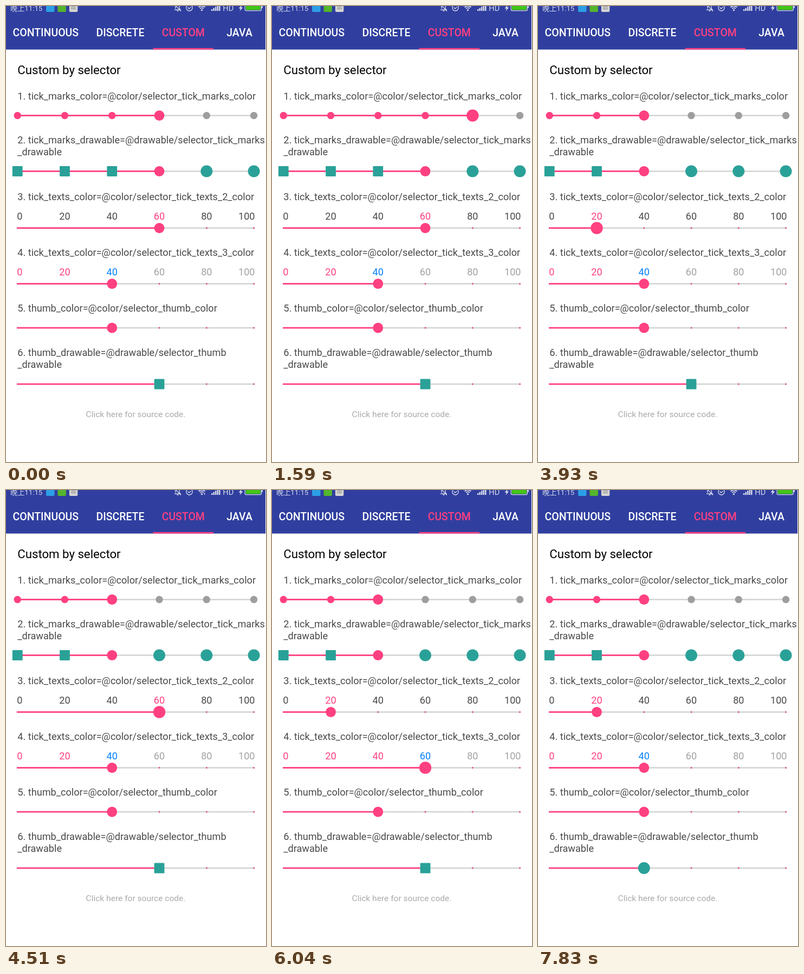
These frames come from a looping animation (480x843 px, 8000 ms). An HTML page with a canvas:

```html
<!DOCTYPE html>
<html lang="en">
<head>
<meta charset="utf-8">
<title>Custom by selector</title>
<style>
  html, body { margin: 0; width: 100%; height: 100%; overflow: hidden; background: #fff; }
  canvas { display: block; width: 480px; height: 843px; }
</style>
</head>
<body>
<canvas id="stage"></canvas>
<script>
const W = 480, H = 843, LOOP = 8000, STEP = 94;
const PINK = '#ff4081', BLUE = '#007fff', TEAL = '#2aa198', BAR = '#303f9f';
const TRACK = '#d2d6d2', GREY = '#9e9e9e', DARK = '#4a4a4a', INK = '#d5daec';
const FONT = 'Roboto, "Noto Sans CJK SC", "Noto Sans CJK", sans-serif';

const canvas = document.getElementById('stage');
const ctx = canvas.getContext('2d');
const scale = window.devicePixelRatio || 1;
canvas.width = W * scale;
canvas.height = H * scale;

const tickX = i => 21.2 + 87.28 * i;

// A drag walks from its time towards its tick, `stride` ticks every STEP ms.
const drag = (time, tick, stride = 1) => ({ time, tick, stride });

const sliders = [
  { y: 202.5, start: 3, kind: 'dots',
    lines: ['1. tick_marks_color=@color/selector_tick_marks_color'],
    drags: [drag(320, 1, 2), drag(640, 4), drag(1110, 1), drag(1390, 5, 2),
            drag(1590, 4), drag(1680, 2, 2)] },
  { y: 305.5, start: 3, kind: 'icons',
    lines: ['2. tick_marks_drawable=@drawable/selector_tick_marks', '_drawable'],
    drags: [drag(2010, 4), drag(2430, 1), drag(2900, 4, 2), drag(3180, 2)], release: 3360 },
  { y: 410.5, start: 3,
    lines: ['3. tick_texts_color=@color/selector_tick_texts_2_color'],
    textColor: (i, at) => i === at ? PINK : DARK,
    drags: [drag(3650, 3), drag(3740, 2), drag(3930, 1), drag(4130, 5), drag(4510, 1, 2)] },
  { y: 513.5, start: 2,
    lines: ['4. tick_texts_color=@color/selector_tick_texts_3_color'],
    textColor: (i, at) => i < at ? PINK : i === at ? BLUE : '#a2a2a2',
    drags: [drag(5010, 1), drag(5050, 2), drag(5190, 4), drag(5560, 1, 2),
            drag(5950, 5, 2), drag(6140, 2)] },
  { y: 595, start: 2, heldColor: BLUE,
    lines: ['5. thumb_color=@color/selector_thumb_color'],
    drags: [drag(6610, 3), drag(6990, 4), drag(7180, 1, 2), drag(7470, 2)] },
  { y: 699, start: 3, iconThumb: true,
    lines: ['6. thumb_drawable=@drawable/selector_thumb', '_drawable'],
    drags: [drag(7830, 2)] }
];

// Touching the next slider lets go of the one before, unless it was released earlier.
sliders.forEach((s, i) => {
  const next = sliders[i + 1];
  s.release ??= next ? next.drags[0].time : LOOP;
});

function tickAt(s, t) {
  let pos = s.start;
  s.drags.forEach((d, i) => {
    if (t < d.time) return;
    const next = s.drags[i + 1];
    const end = next ? Math.min(t, next.time - 1) : t;
    const reach = d.stride * (1 + Math.floor((end - d.time) / STEP));
    pos += Math.sign(d.tick - pos) * Math.min(reach, Math.abs(d.tick - pos));
  });
  return pos;
}

function rect(x, y, w, h, color) {
  ctx.fillStyle = color;
  ctx.fillRect(x, y, w, h);
}

function disc(x, y, r, color) {
  ctx.fillStyle = color;
  ctx.beginPath();
  ctx.arc(x, y, r, 0, Math.PI * 2);
  ctx.fill();
}

function roundBox(x, y, w, h, r, color) {
  ctx.fillStyle = color;
  ctx.beginPath();
  ctx.roundRect(x, y, w, h, r);
  ctx.fill();
}

function shape(path, color) {
  ctx.fillStyle = color;
  ctx.fill(new Path2D(path));
}

function line(path, width) {
  ctx.strokeStyle = INK;
  ctx.lineWidth = width;
  ctx.stroke(new Path2D(path));
}

function text(str, x, y, size, color, align = 'left', weight = 400) {
  ctx.font = `${weight} ${size}px ${FONT}`;
  ctx.textAlign = align;
  ctx.fillStyle = color;
  ctx.fillText(str, x, y);
}

function icon(x, y, round) {
  if (round) disc(x, y, 11, TEAL);
  else roundBox(x - 9.4, y - 9.4, 18.8, 18.8, 1.2, TEAL);
}

function drawWifi(t) {
  for (const r of [4.5, 8, 11.5]) {
    ctx.strokeStyle = INK;
    ctx.lineWidth = 1.8;
    ctx.beginPath();
    ctx.arc(361.5, 8, r, -Math.PI * 0.76, -Math.PI * 0.24);
    ctx.stroke();
  }
  disc(361.5, 7.6, 1.7, INK);
  const beat = Math.floor((t - 2530) / 980);
  if (beat === 0 || beat === 2) shape('M365 6h3l-1.5 3.5z', INK);
}

function drawStatus(t) {
  text('晚上11:15', 8, 9, 13.2, INK);
  ['#2c9fe6', '#55b52c', '#d4d4d4'].forEach((color, i) => {
    roundBox(74 + 21.4 * i, -5, 15.5, 16, 2.5, color);
  });
  for (const y of [1, 4.5]) rect(120, y, 9, 1.3, '#8c8c8c');

  line('M311 7h11l-2-3v-7M313 5v-8M311-3l12 12.5M315.5 9h3', 1.3);
  line('M332.8 3.3a5.7 5.7 0 1 0 11.4 0a5.7 5.7 0 1 0-11.4 0M335.5 2.5l2.5 2.5 3.5-3', 1.3);
  drawWifi(t);
  for (let i = 0; i < 5; i++) {
    const h = 3 + 2.3 * i;
    rect(379 + 3.5 * i, 9 - h, 2.5, h, INK);
  }
  text('HD', 400.3, 9, 14.6, INK);
  shape('M435-2l-5.5 6.5h3.3l-1.3 5 6-7H434z', INK);

  roundBox(440.5, -5, 31.5, 14.3, 3, INK);
  roundBox(441.7, -4, 29, 12, 2, BAR);
  roundBox(442.5, -4, 27.4, 11.2, 1.5, '#43c517');
  rect(472, -1, 1.8, 5, INK);
}

function drawTab(name, x, active) {
  text(name, x, 56, 19.48, active ? PINK : '#fff', 'center', 500);
  if (active) rect(x - 55.8, 77.8, 111.6, 2.7, PINK);
}

function drawHeader(t) {
  rect(0, 0, W - 1, 80.5, BAR);
  drawStatus(t);
  drawTab('CONTINUOUS', 73.3);
  drawTab('DISCRETE', 211);
  drawTab('CUSTOM', 327.3, true);
  drawTab('JAVA', 431);
}

function drawLabel(s) {
  const last = Math.round(s.y - (s.textColor ? 51.6 : 30));
  s.lines.forEach((str, i) => {
    text(str, 21.3, last - 22 * (s.lines.length - 1 - i), 18.14, DARK);
  });
}

function drawTickTexts(s, at) {
  for (let i = 0; i < 6; i++) {
    const align = i === 0 ? 'left' : i === 5 ? 'right' : 'center';
    const x = i === 0 ? 20.3 : i === 5 ? 459.5 : tickX(i);
    text(String(i * 20), x, s.y - 15.5, 18.14, s.textColor(i, at), align);
  }
}

function drawTick(s, i, at) {
  const x = tickX(i), passed = i < at;
  if (s.kind === 'dots') disc(x, s.y, 6.7, passed ? PINK : GREY);
  else if (s.kind === 'icons') icon(x, s.y, !passed);
  else if (!passed) rect(x - 1.3, s.y - 1.3, 2.6, 2.6, '#e14b78');
}

function drawSlider(s, t) {
  const held = t >= s.drags[0].time && t < s.release;
  const at = tickAt(s, t);
  const x = tickX(at);

  drawLabel(s);
  if (s.textColor) drawTickTexts(s, at);
  rect(x, s.y - 1.3, 459 - x, 2.6, TRACK);
  rect(20, s.y - 1.4, x - 20, 2.8, PINK);
  for (let i = 0; i < 6; i++) if (i !== at) drawTick(s, i, at);

  if (s.iconThumb) icon(x, s.y, held);
  else disc(x, s.y, held ? 11.2 : 9.4, held && s.heldColor || PINK);
}

function draw(t) {
  ctx.setTransform(scale, 0, 0, scale, 0, 0);
  rect(0, 0, W, H, '#fff');
  drawHeader(t);
  text('Custom by selector', 21.3, 126, 22.2, '#000');
  for (const s of sliders) drawSlider(s, t);
  text('Click here for source code.', 239.5, 760, 15.55, '#aaa', 'center');
}

const begin = performance.now();
function frame() {
  draw((performance.now() - begin) % LOOP);
  requestAnimationFrame(frame);
}
frame();
</script>
</body>
</html>
```
